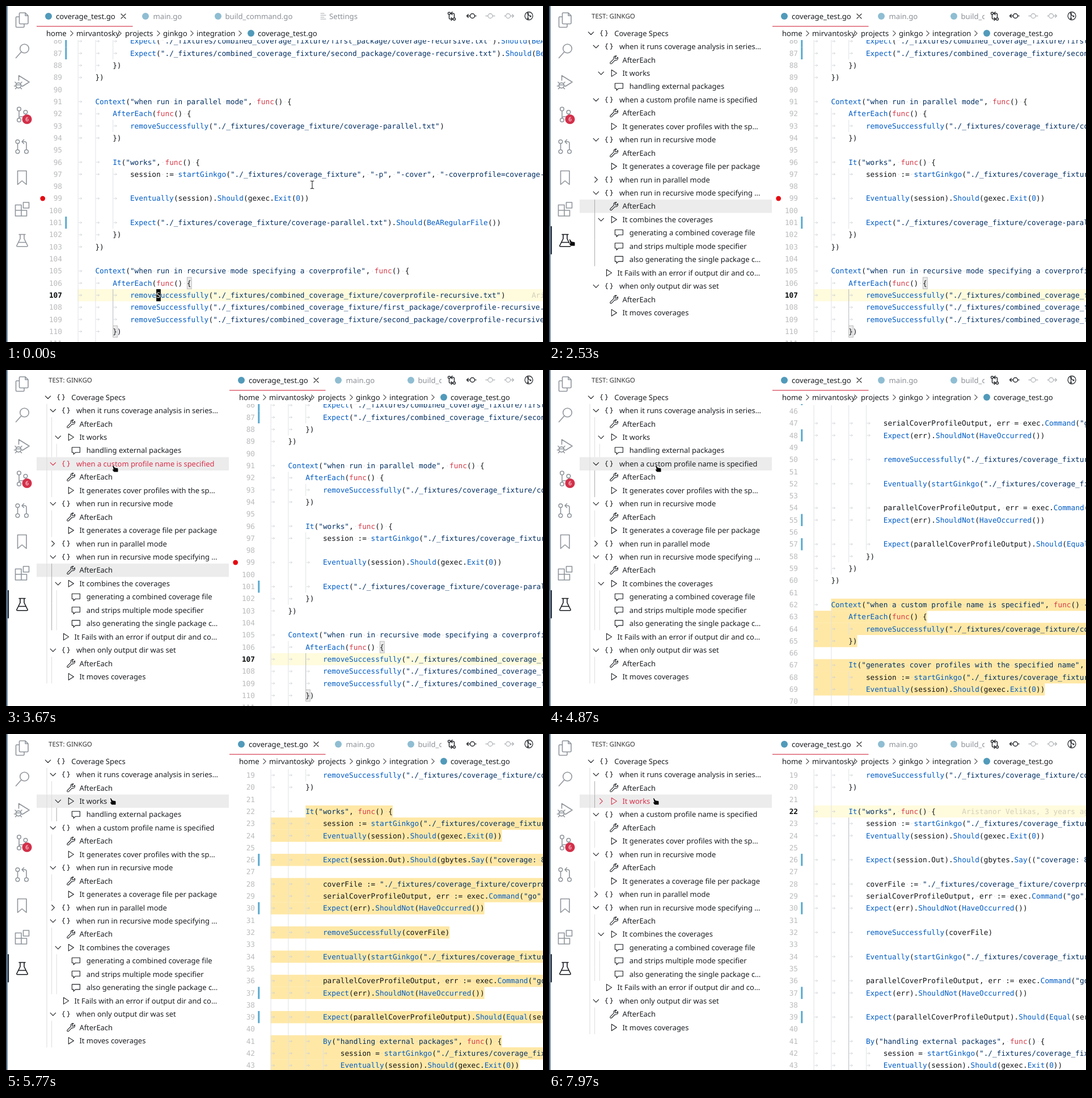
Recreate the animation shown at these times as an HTML page. Size 947x592 px, loop 8.16 s.

```html
<!DOCTYPE html>
<html lang="en">
<head>
<meta charset="utf-8">
<title>Test explorer in a code editor</title>
<style>
html, body { margin: 0; width: 100%; height: 100%; overflow: hidden; background: #fff; }
svg { display: block; width: 100vw; height: 100vh; }
text { text-rendering: geometricPrecision; white-space: pre; }
.ui { font-family: "Noto Sans", sans-serif; font-size: 13.15px; fill: #1c1f23; }
.tree text { font-family: "Noto Sans", sans-serif; font-size: 12.95px; fill: currentColor; }
.code text { font-family: "DejaVu Sans Mono", monospace; font-size: 12.78px; }
.line { fill: none; stroke: currentColor; stroke-linejoin: round; stroke-linecap: round; }
</style>
</head>
<body>
<svg id="stage" viewBox="0 0 947 592">
  <defs>
    <clipPath id="codeClip"><rect x="54" y="60" width="893" height="532"/></clipPath>
    <clipPath id="tabClip"><rect x="54" y="0" width="714" height="40"/></clipPath>
  </defs>
  <rect width="947" height="592" fill="#fff"/>
</svg>
<script>
const LOOP = 8160, SHIFT = 340, CW = 7.695, LH = 21.31, X0 = 126.6, ROW = 23.45;
const stage = document.getElementById('stage');

function add(parent, tag, attrs = {}, text) {
  const e = document.createElementNS('http://www.w3.org/2000/svg', tag);
  for (const k in attrs) e.setAttribute(k, attrs[k]);
  if (text !== undefined) e.textContent = text;
  parent.appendChild(e);
  return e;
}
const group = (p, attrs) => add(p, 'g', attrs);
const rect = (p, x, y, width, height, fill) => add(p, 'rect', { x, y, width, height, fill });
const dot = (p, cx, cy, r, fill) => add(p, 'circle', { cx, cy, r, fill });
const stroke = (p, d, w = 1.1, more = {}) =>
  add(p, 'path', { d, class: 'line', 'stroke-width': w, ...more });
const label = (p, x, y, s, fill) => add(p, 'text', fill ? { x, y, style: `fill:${fill}` } : { x, y }, s);
const show = (e, on) => e.setAttribute('display', on ? 'inline' : 'none');
const move = (e, x, y = 0) => e.setAttribute('transform', `translate(${x} ${y})`);
const ring = (x, y, r) => `M${x - r},${y}a${r},${r} 0 1 0 ${2 * r},0a${r},${r} 0 1 0 ${-2 * r},0`;

/* ---------- code ---------- */
const FIX = '"./_fixtures/coverage_fixture', COMB = '"./_fixtures/combined_coverage_fixture/';
const REG = ').Should(BeARegularFile())', EXIT = 'Eventually(session).Should(gexec.Exit(0))';
const NOERR = 'Expect(err).ShouldNot(HaveOccurred())', RM = 'removeSuccessfully(';
const COVER = 'exec.Command("go", "tool", "cover", "-func", coverFile).CombinedOutput()';
const SAME = 'Expect(parallelCoverProfileOutput).Should(Equal(serialCoverProfileOutput))';

// The leading digit is the tab depth; empty lines keep the depth above them.
const views = [
  { first: 86, top: 51.4, bars: [86, 87, 101], lines: [
    `3Expect(${COMB}first_package/coverage-recursive.txt"${REG}`,
    `3Expect(${COMB}second_package/coverage-recursive.txt"${REG}`,
    '2})', '1})', '',
    '1Context("when run in parallel mode", func() {',
    '2AfterEach(func() {', `3${RM}${FIX}/coverage-parallel.txt")`, '2})', '',
    '2It("works", func() {',
    `3session := startGinkgo(${FIX}", "-p", "-cover", "-coverprofile=coverage-parallel.txt")`, '',
    '3' + EXIT, '', `3Expect(${FIX}/coverage-parallel.txt"${REG}`, '2})', '1})', '',
    '1Context("when run in recursive mode specifying a coverprofile", func() {',
    '2AfterEach(func() {',
    `3${RM}${COMB}coverprofile-recursive.txt")`,
    `3${RM}${COMB}first_package/coverprofile-recursive.txt")`,
    `3${RM}${COMB}second_package/coverprofile-recursive.txt")`,
    '2})', ''] },
  { first: 46, top: 61.9, bars: [45, 48, 55, 57], from: 62, lines: [
    '4', '4serialCoverProfileOutput, err = ' + COVER, '4' + NOERR, '',
    `4${RM}${FIX}/coverprofile.txt")`, '',
    `4Eventually(startGinkgo(${FIX}", "-p", "-cover")).Should(gexec.Exit(0))`, '',
    '4parallelCoverProfileOutput, err = ' + COVER, '4' + NOERR, '', '4' + SAME,
    '3})', '2})', '1})', '',
    '1Context("when a custom profile name is specified", func() {',
    '2AfterEach(func() {', `3${RM}${FIX}/coverage.txt")`, '2})', '',
    '2It("generates cover profiles with the specified name", func() {',
    `3session := startGinkgo(${FIX}", "-cover", "-coverprofile=coverage.txt")`,
    '3' + EXIT, ''] },
  { first: 19, top: 61.9, bars: [26, 30, 37, 39], from: 22, lines: [
    `3${RM}${FIX}/coverprofile.out")`, '2})', '',
    '2It("works", func() {', `3session := startGinkgo(${FIX}", "-cover")`, '3' + EXIT, '',
    '3Expect(session.Out).Should(gbytes.Say(("coverage: 80.0% of statements")))', '',
    `3coverFile := ${FIX}/coverprofile.out"`,
    '3serialCoverProfileOutput, err := ' + COVER, '3' + NOERR, '',
    `3${RM}coverFile)`, '',
    `3Eventually(startGinkgo(${FIX}", "-p", "-cover")).Should(gexec.Exit(0))`, '',
    '3parallelCoverProfileOutput, err := ' + COVER, '3' + NOERR, '', '3' + SAME, '',
    '3By("handling external packages", func() {',
    `4session = startGinkgo(${FIX}", "-coverpkg=fmt")`, '4' + EXIT] }
];

const col = c => X0 + c * CW;
const lineTop = (v, n) => v.top + (n - v.first) * LH;
const mid = (v, n) => lineTop(v, n) + LH / 2;
const base = (v, n) => mid(v, n) + 4.4;

function colour(word, next) {
  if (word[0] === '"') return '#032f62';
  if (word === 'func') return '#d73a49';
  return (/\w/.test(word) && next === '(') || /^\d+$/.test(word) ? '#005cc5' : '#111418';
}

function drawCode(v, n, depth, src) {
  const y = mid(v, n), by = base(v, n), g = v.g, start = depth * 4;
  if (v.from && n >= v.from && src) {
    const x = n === v.from ? col(start) : X0;
    rect(v.range, x, lineTop(v, n), col(start + src.length) - x, LH + .2, '#ffe8a6');
  }
  for (let k = 0; k < depth; k++) {
    const x = col(k * 4), lit = k === 2 && (v.first === 86 ? n > 106 && n < 110 : v.first === 19 && n > 22);
    const line = rect(g, x, lineTop(v, n), 1, LH + .1, '#dfe2e5');
    if (lit) v.lit.push(line);
    if (src) stroke(g, `M${x + 2},${y}h5m-1.8,-1.8l1.8,1.8l-1.8,1.8`, .8, { color: '#ccd0d5' });
  }
  for (const m of src.matchAll(/"[^"]*"?|\w+|[^\w"\s]+/g))
    label(g, col(start + m.index), by, m[0], colour(m[0], src[m.index + m[0].length]));
  for (const m of src.matchAll(/ /g)) dot(g, col(start + m.index + .5), y + .3, .75, '#ccd0d5');
  v.num[n] = add(g, 'text', { x: 99, y: by, 'text-anchor': 'end', fill: '#babbbd' }, n);
}

function cursorBlock(v, n, c, ch) {
  const g = group(v.g);
  rect(g, col(c), lineTop(v, n), CW, LH, '#000');
  label(g, col(c), base(v, n), ch, '#fff');
  return g;
}
function activeLine(v, n) {
  rect(v.row, X0 - .3, lineTop(v, n), 830, LH, '#fffbdd');
  const s = v.lines[n - v.first];
  v.note = label(v.row, col(s[0] * 4 + s.length - 1 + 6), base(v, n),
    'Aristanor Velikas, 3 years ago • Fix coverage', 'rgba(110,110,110,.3)');
}
function setActive(v, n, on) {
  v.num[n].setAttribute('fill', on ? '#0c0e10' : '#babbbd');
  v.num[n].setAttribute('font-weight', on ? 'bold' : 'normal');
  for (const e of v.lit) e.setAttribute('fill', on ? '#b4b8bd' : '#dfe2e5');
}

const codeBox = group(stage, { 'clip-path': 'url(#codeClip)', class: 'code' });
const editor = group(codeBox);
for (const v of views) {
  v.g = group(editor);
  v.row = group(v.g);
  v.range = group(v.g);
  v.num = {};
  v.lit = [];
  if (v.first === 86)
    for (const [n, c] of [[106, 25], [110, 8]])
      add(v.g, 'rect', { x: col(c) + .5, y: lineTop(v, n) + .5, width: CW, height: LH - 1, fill: '#eaeaea', stroke: '#b9b9b9' });
  let depth = 0;
  v.lines.forEach((s, i) => {
    if (s) depth = +s[0];
    drawCode(v, v.first + i, depth, s.slice(1));
  });
  for (const n of v.bars) rect(v.g, 104.3, lineTop(v, n), 3, LH, '#58a9cf');
}
const [A, B, C] = views;
activeLine(A, 107);
setActive(A, 107, true);
activeLine(C, 22);
dot(A.g, 64.7, mid(A, 99), 4.4, '#e5060f');
const hint = dot(A.g, 64.7, 0, 4.4, '#f0949c');
const folds = group(A.g, { color: '#4a4f55' });
for (const n of [91, 92, 96, 105, 106]) stroke(folds, `M110.3,${mid(A, n) - 2}l4.7,4.6l4.7,-4.6`);
const curA = cursorBlock(A, 107, 18, 'S');
const curC = cursorBlock(C, 22, 8, 'I');

/* ---------- tabs and path bar ---------- */
const tabs = group(group(stage, { 'clip-path': 'url(#tabClip)' }), { class: 'ui' });
const GO = '#519aba', DIM = '#8b9096';
dot(tabs, 75, 18, 6, GO);
label(tabs, 88, 23, 'coverage_test.go');
stroke(tabs, 'M203,14l8,8m0,-8l-8,8', 1.2, { color: '#333' });
rect(tabs, 54, 35, 169.5, 1.5, '#dd6272');
dot(tabs, 246, 18, 6, '#8fbdd2');
label(tabs, 259.5, 23, 'main.go', DIM);
dot(tabs, 374, 18, 6, '#8fbdd2');
label(tabs, 386.5, 23, 'build_command.go', DIM);
stroke(tabs, 'M555,13h6m-6,3.3h9m-9,3.4h6m-6,3.3h9', 1.1, { color: '#a4a8ac' });
label(tabs, 570, 23, 'Settings', DIM);
const scroll = rect(tabs, 54, 34, 226, 3, 'rgba(100,100,100,.26)');

const crumbs = group(stage, { class: 'ui' });
[[71, 'home'], [124, 'mirvantosky'], [210, 'projects'], [277, 'ginkgo'], [336, 'integration'], [444, 'coverage_test.go']]
  .forEach(([x, s]) => label(crumbs, x, 52.6, s));
for (const x of [116, 201, 269, 328, 413]) stroke(crumbs, `M${x - 2.2},43.8l4.4,4.4l-4.4,4.4`, 1.1, { color: '#444' });
dot(crumbs, 432, 48, 6, GO);

const tools = group(stage, { color: '#2b2f33' });
stroke(tools, `${ring(781.5, 13, 2)}M781.5,15v6q0,2 2,2h4m-2.5,-2.5l2.5,2.5l-2.5,2.5${ring(790.5, 23, 2)}M790.5,21v-6q0,-2 -2,-2h-4m2.5,-2.5l-2.5,2.5l2.5,2.5`, 1.5);
stroke(tools, ring(822.5, 17.5, 4) + 'M826.5,17.5h2.5M818.5,17.5h-6m2.8,-2.8l-2.8,2.8l2.8,2.8', 1.5);
stroke(tools, ring(854, 17.5, 4) + 'M858,17.5h4M850,17.5h-4', 1.3, { color: '#b4b8bb' });
stroke(tools, ring(885.5, 17.5, 4) + 'M881.5,17.5h-2.5M889.5,17.5h6m-2.8,-2.8l2.8,2.8l-2.8,2.8', 1.3, { color: '#b4b8bb' });
stroke(tools, ring(922, 17.5, 7) + 'M920.5,12v11M920.5,15l4,3', 1.3);
for (const [x, y] of [[920.5, 13.5], [925, 18], [920.5, 22]]) dot(tools, x, y, 1.5, '#2b2f33');

/* ---------- activity bar ---------- */
rect(stage, 0, 0, 2.6, 592, '#48657c');
const bar = group(stage, { color: '#8f959b' });
[
  'M23.5,13.5q0,-1.5 1.5,-1.5h9l5,5v13q0,1.5 -1.5,1.5h-12.500q-1.500,0 -1.500,-1.500zM34,12v5h5M23,19h-4q-1.500,0 -1.500,1.500v15.500q0,1.500 1.500,1.500h11.500q1.500,0 1.500,-1.500v-4',
  ring(32.5, 75, 7.8) + 'M27,80.700L17.500,91.500',
  'M22.500,131v-8.500l18.500,11.500l-12,7.500' + ring(22, 140, 4.6) + 'M17.500,139h9M18,136l-2,-2M26,136l2,-2M17,141h-2.500M27,141h2.500M18.500,144l-2,2M25.500,144l2,2',
  ring(23, 181.500, 3.300) + ring(34.500, 187, 3.300) + ring(23, 201, 3.300) + 'M23,185v12.500M34.500,190.500q0,4.500 -5,4.500h-3q-3.500,0 -3.500,3',
  ring(20.500, 239, 3.300) + ring(20.500, 256.500, 3.300) + ring(36, 256.500, 3.300) + 'M20.500,242.500v10.500M36,253v-11q0,-3 -3,-3h-5m3.500,-3.500l-3.500,3.500l3.500,3.500',
  'M20.500,290.500h15.500v24l-7.800,-6.500l-7.700,6.500z',
  'M16.500,350.500h10.500v19.500h-10.500zM16.500,360h20v10h-10M30.500,346h10v10h-10z'
].forEach(d => stroke(bar, d, 1.6));
const flask = stroke(bar, 'M23,402.500h11M25,402.500v7.500l-6,12q-0.500,1.800 1.200,1.800h16.600q1.700,0 1.200,-1.800l-6,-12v-7.500M22,416.500h13', 1.6);
dot(bar, 37, 199.500, 8.600, '#d3304a');
add(bar, 'text', { x: 37, y: 203.200, 'text-anchor': 'middle', fill: '#fff', 'font-family': 'Noto Sans, sans-serif', 'font-size': 10 }, '6');
const marker = rect(stage, 3, 388, 2.1, 49.5, '#1c2538');

/* ---------- test tree ---------- */
const ICONS = {
  '{': 'M-2.6,-4.8q-2,0 -2,1.900v1.300q0,1.600 -1.400,1.600q1.400,0 1.400,1.600v1.300q0,1.900 2,1.900M2.600,-4.800q2,0 2,1.900v1.300q0,1.600 1.400,1.600q-1.400,0 -1.400,1.600v1.300q0,1.900 -2,1.900',
  w: 'M-6.300,4.300l6,-6q-0.900,-3.300 1.700,-4.900q1.500,-0.800 3,-0.400l-2.600,2.600l0.400,2l2,0.400l2.600,-2.600q0.800,2.700 -1.100,4.500q-1.800,1.500 -4,0.800l-6,6q-1.200,0.800 -2.200,-0.200q-0.900,-1.200 0.200,-2.200z',
  p: 'M-4.300,-5.800L4.800,0L-4.300,5.800z',
  c: 'M-7,-5.500h14v9h-8l-3.300,3.300v-3.300h-2.700z'
};
// depth, twistie (v open, > closed, - none), icon, label
const ROWS = [
  '0v{Coverage Specs', '1v{when it runs coverage analysis in series…', '2-wAfterEach', '2vpIt works',
  '3-chandling external packages', '1v{when a custom profile name is specified', '2-wAfterEach',
  '2-pIt generates cover profiles with the sp…', '1v{when run in recursive mode', '2-wAfterEach',
  '2-pIt generates a coverage file per package', '1>{when run in parallel mode',
  '1v{when run in recursive mode specifying …', '2-wAfterEach', '2vpIt combines the coverages',
  '3-cgenerating a combined coverage file', '3-cand strips multiple mode specifier',
  '3-calso generating the single package c…', '1-pIt Fails with an error if output dir and co…',
  '1v{when only output dir was set', '2-wAfterEach', '2-pIt moves coverages'
];
const OPEN = 'M-4.700,-2.200l4.700,4.700l4.700,-4.700', SHUT = 'M-2.200,-4.700l4.700,4.700l-4.700,4.700';
const tree = group(stage, { class: 'tree' });
add(tree, 'text', { x: 75, y: 22.3, style: 'font-size:11.5px;fill:#333' }, 'TEST: GINKGO');
const rows = ROWS.map(s => {
  const depth = +s[0], g = group(tree), x = 97 + 8.8 * depth;
  const back = rect(g, 54, -ROW / 2, 339, ROW, '#ececec'), guides = [];
  for (let k = 0; k < depth; k++) guides.push(rect(g, 71.5 + 8.6 * k, -ROW / 2, 1, ROW + .1, '#dcdcdc'));
  const twist = s[1] === '-' ? null
    : stroke(g, s[1] === 'v' ? OPEN : SHUT, 1.1, { transform: `translate(${74 + 8.9 * depth} 0)` });
  stroke(g, ICONS[s[2]], 1.1, { transform: `translate(${x} 0)` });
  label(g, x + (s[2] === 'w' || s[2] === 'p' ? 14.8 : 18.3), 4.6, s.slice(3));
  return { g, depth, back, guides, twist };
});

// Index range and level of the highlighted guide for the selected row.
function litGuide(sel, shut) {
  let head = sel;
  if (!(rows[sel].twist && !shut)) while (rows[head].depth >= rows[sel].depth) head--;
  let end = head + 1;
  while (end < rows.length && rows[end].depth > rows[head].depth) end++;
  return [head, end, rows[head].depth];
}

function drawTree(sel, hover, shut, focusLost, guidesOn) {
  const [a, b, level] = litGuide(sel, shut);
  rows.forEach((r, i) => {
    show(r.g, !(shut && i === 4));
    move(r.g, 0, 48 + ROW * (i - (shut && i > 4 ? 1 : 0)));
    r.g.setAttribute('color', i === hover && (i !== sel || focusLost) ? '#d9304a' : '#1c1f23');
    show(r.back, i === sel || i === hover);
    r.guides.forEach((e, k) => {
      const lit = k === level && i > a && i < b;
      e.setAttribute('fill', lit ? '#a9a9a9' : '#dcdcdc');
      show(e, lit || guidesOn);
    });
  });
  rows[3].twist.setAttribute('d', shut ? SHUT : OPEN);
}

/* ---------- mouse pointer ---------- */
const beam = group(stage);
stroke(beam, 'M-2.800,-6.800q2.800,0 2.800,1.500v10.600q0,1.500 -2.800,1.500M2.800,-6.800q-2.800,0 -2.800,1.500M2.800,6.800q-2.800,0 -2.800,-1.500', 1.1, { color: '#222' });
const shape = d => add(group(stage), 'path', { d, fill: '#0a0a0a', stroke: '#fff', 'stroke-width': .9 }).parentNode;
const arrow = shape('M0,-1v12.800l2.800,-2.500l2,4.500l2,-0.900l-2,-4.300h3.900z');
const hand = shape('M-0.500,0.500q1,-1.500 2.400,0l2,3.300l4.500,0.700q1.600,0.300 1.600,2v4.500q0,1 -1,1h-5.500q-1.500,0 -2.300,-1.200l-2,-3q0.300,-1.500 2,-0.700z');

const PATH = [[0, 540, 315], [730, 540, 315], [930, 470, 315], [1400, 470, 315], [1570, 300, 345],
  [1670, 150, 383], [1770, 72, 409], [1900, 52, 412], [2130, 36, 411], [2900, 36, 411],
  [3100, 110, 345], [3260, 174, 259], [3330, 183, 198], [3480, 189, 174], [3670, 188, 168],
  [4870, 188, 168], [4970, 188, 162], [5130, 186, 135], [5300, 184, 113], [LOOP, 184, 113]];
function pointerAt(t) {
  let i = 1;
  while (i < PATH.length - 1 && PATH[i][0] < t) i++;
  const [t0, x0, y0] = PATH[i - 1], [t1, x1, y1] = PATH[i];
  const k = Math.max(0, Math.min(1, (t - t0) / (t1 - t0)));
  return [x0 + (x1 - x0) * k, y0 + (y1 - y0) * k];
}

/* ---------- timeline ---------- */
const within = (t, a, b) => t >= a && t < b;

function render(t) {
  const open = t >= 2530, dx = open ? SHIFT : 0;
  const view = t < 4130 ? A : t < 5770 ? B : C;
  const inCode = t >= 6500;
  for (const g of [editor, tabs, crumbs]) move(g, dx);
  for (const v of views) show(v.g, v === view);
  show(curA, t < 470 || within(t, 1970, 2430));
  show(C.row, inCode);
  show(C.range, !inCode);
  show(C.note, t >= 6800);
  setActive(C, 22, inCode);
  show(curC, within(t, 6500, 7000) || within(t, 7600, 7970));
  show(folds, within(t, 1670, 2270));
  show(scroll, within(t, 2600, 3670));
  scroll.setAttribute('opacity', Math.min(1, (3670 - t) / 300));

  const [x, y] = pointerAt(t);
  const useHand = t > 2400 || x < 54, useArrow = !useHand && x < 126;
  show(beam, !useHand && !useArrow);
  show(arrow, useArrow);
  show(hand, useHand);
  for (const p of [beam, arrow, hand]) move(p, x, y);
  show(hint, t < 2400 && within(x, 54, 80));
  hint.setAttribute('cy', mid(A, A.first + Math.floor((y - A.top) / LH)));
  flask.setAttribute('color', t > 2430 || (t > 1900 && x < 54) ? '#15181c' : '#8f959b');
  show(marker, t >= 2430);

  show(tree, open);
  if (open) {
    const [hx, hy] = pointerAt(t - 70);
    const hover = hx > 54 ? Math.floor((hy + 3 - 48) / ROW + .5) : -1;
    drawTree(t < 4030 ? 13 : t < 5670 ? 5 : 3, hover, t >= 6430, inCode, hx > 54);
  }
}

const begin = performance.now();
function tick() {
  render((performance.now() - begin) % LOOP);
  requestAnimationFrame(tick);
}
tick();
</script>
</body>
</html>
```
